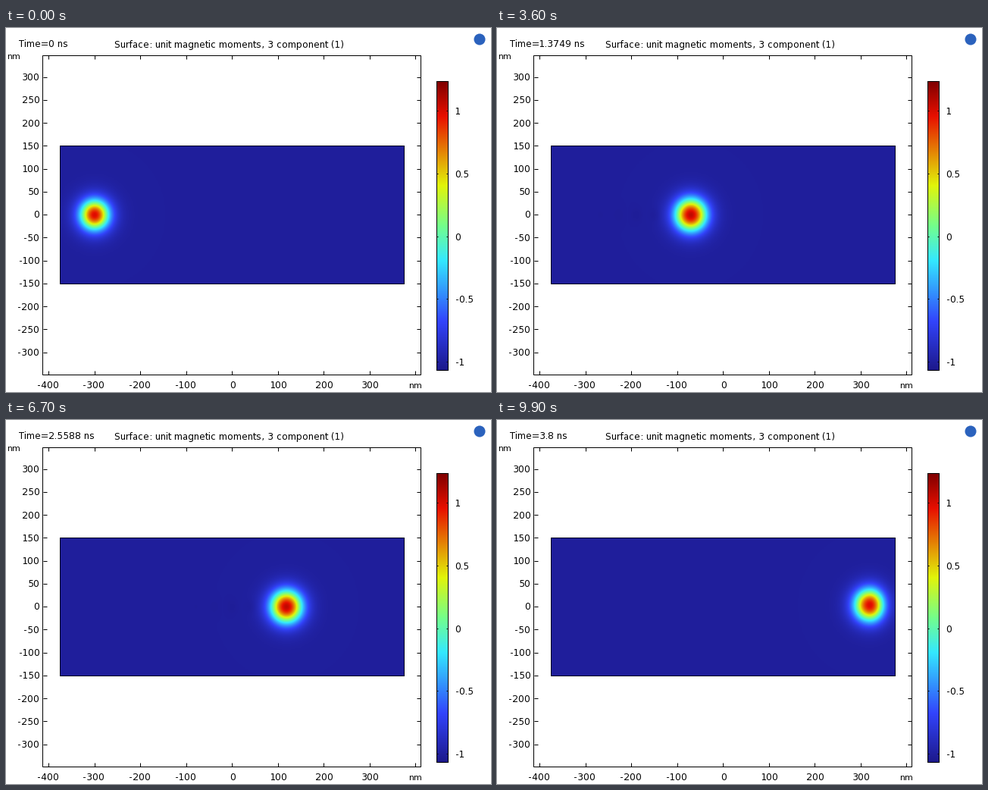
Recreate the animation shown at these times as a matplotlib script. Size 640 by 480 pixels, loop 10 s.

```python
import numpy as np
import matplotlib.pyplot as plt
from matplotlib.animation import FuncAnimation
from matplotlib.colors import LinearSegmentedColormap
from matplotlib.patches import Circle, Rectangle

W, H, DPI = 640, 480, 80
PX = 72 / DPI               # points per pixel
FRAMES, END = 100, 3.8
STEP = END / 99.5           # ns per frame
X0, Y0, NM = 298.5, 246.5, 0.605   # origin and pixels per nm
VMIN, VMAX = -1.063, 1.242

rainbow = LinearSegmentedColormap.from_list("rainbow", [
    (0.00, "#1c188a"), (0.17, "#3244fc"), (0.38, "#34e8ff"),
    (0.50, "#73ff8c"), (0.64, "#e1f50a"), (0.88, "#e80f00"),
    (1.00, "#800000")], N=512)

# whole-pixel glyph advances
plt.rcParams.update({"font.family": "DejaVu Sans", "text.hinting_factor": 1})
fig = plt.figure(figsize=(W / DPI, H / DPI), dpi=DPI, facecolor="white")
ax = fig.add_axes([0, 0, 1, 1])
ax.axis("off")


def label(x, y, s, size=12, ha="left"):
    return ax.text(x, y, s, fontsize=size * PX, ha=ha, va="baseline")


def line(x1, y1, x2, y2):
    ax.plot([x1, x2], [y1, y2], color="black", lw=PX, solid_capstyle="butt")


def box(x1, y1, x2, y2, color="black"):
    ax.add_patch(Rectangle((x1, y1), x2 - x1, y2 - y1, fill=False,
                           ec=color, lw=PX, zorder=3))


def picture(data, x1, y1, x2, y2):
    return ax.imshow(data, extent=(x1, x2, y2, y1), cmap=rainbow, vmin=VMIN,
                     vmax=VMAX, interpolation="nearest", aspect="auto")


# plot frame, ticks and labels
box(48, 36, 547, 457)
for v in range(-400, 401, 100):
    x = X0 + v * NM
    for y in (36, 452):
        line(int(x), y, int(x), y + 5)
    if v < 400:
        label(x + (0.5 if v >= 0 else -1), 475, str(v), ha="center")
for v in range(-300, 301, 50):
    y = Y0 - v * NM
    for x in (49, 542):
        line(x, int(y), x + 5, int(y))
    label(44.5, y + 4, str(v), ha="right")
label(1, 41, "nm", 11)
label(531.5, 475, "nm", 11)

# colour bar
picture(np.linspace(VMAX, VMIN, 382)[:, None], 568, 70, 584, 452)
box(568, 70, 583, 451)
for v in np.arange(1, -1.1, -0.5):
    y = 275 - v * 165.4
    for x in (568, 581):
        line(x, int(y), x + 2, int(y))
    label(592.5, y + 4.5, f"{v:g}")

ax.add_patch(Circle((625, 15), 7.5, color="#2b62bd", lw=0))
label(143, 26, "Surface: unit magnetic moments, 3 component (1)")
clock = label(17, 25, "")

# magnetic strip
gx, gy = np.meshgrid(np.arange(71, 526) + 0.5, np.arange(155, 338) + 0.5)
strip = picture(np.full(gx.shape, -1.0), 71, 155, 526, 338)
box(71, 155, 525, 337, "#05051e")
ax.set_xlim(0, W)
ax.set_ylim(H, 0)


def moment(t):
    """Out-of-plane component of the moving skyrmion at time t."""
    # steady drift with an early push, lifted slightly at the far edge
    cx = 117 + 98.7 * t + 5.9 * t * np.exp(-t * t / 2)
    cy = 246.4 - 2.4 * (t / END) ** 6
    settle = 1 - np.exp(-t / 0.3)
    edge = np.clip((cx - 450) / 42, 0, 1)

    dx, dy = gx - cx, gy - cy
    r = np.hypot(np.where(dx > 0, dx * (1 + 0.12 * edge), dx), dy / 1.03)
    width, radius = 14, 16.3 + 2 * settle - 0.6 * edge
    core = np.sinh(radius / width) ** 2
    wall = np.sinh(r / width) ** 2
    m = (core - wall) / (core + wall)
    m += 0.07 * settle * (1 - edge) * np.exp(-(r / 12) ** 2)

    # faint ripples trailing behind
    wake = 0.035 * np.sin(np.pi * t / END) ** 2 * (dx < -36)
    fade = np.exp((dx + 36) / 50 - (dy / 9) ** 2)
    return m - wake * fade * np.sin((dx + 36) * np.pi / 24) ** 2


def update(i):
    t = min(END, i * STEP) if i < FRAMES - 1 else END
    clock.set_text(f"Time={t:.5g} ns")
    strip.set_data(moment(t))
    return clock, strip


anim = FuncAnimation(fig, update, frames=FRAMES, interval=100,
                     repeat=True, repeat_delay=0)
plt.show()
```
